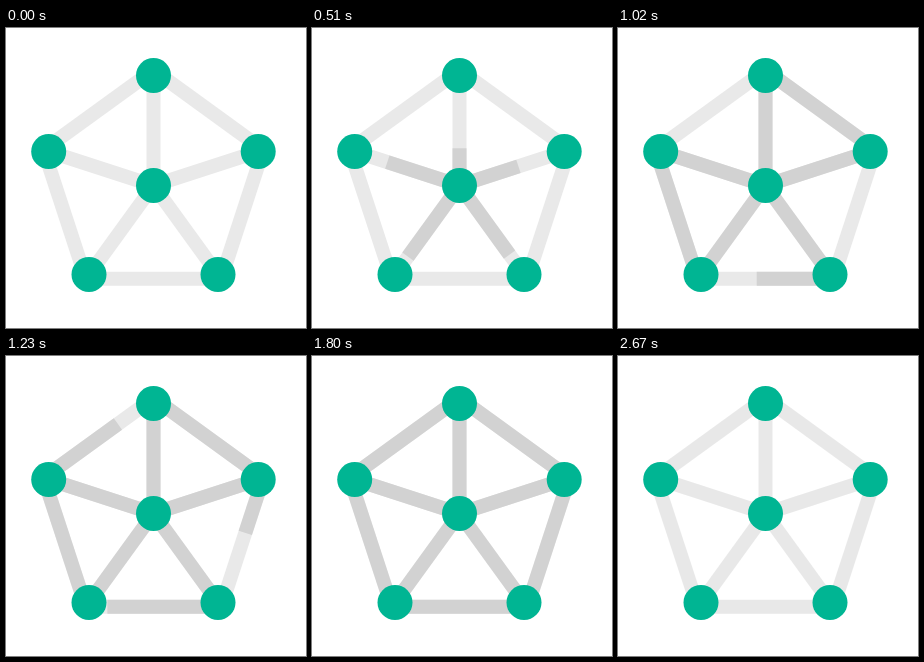
An HTML page that plays this animation: 300 px wide and 300 px high, repeating every 2700 ms.

```html
<!DOCTYPE html>
<html lang="en">
<head>
<meta charset="utf-8">
<title>Network loader</title>
<style>
html, body { margin: 0; width: 100%; height: 100%; overflow: hidden; background: #fff; }
svg { display: block; width: 100%; height: 100%; fill: none; stroke-width: 14; }
#base { stroke: #e9e9e9; }
#active { stroke: #d2d2d2; }
#dots { fill: #00b593; }
</style>
</head>
<body>
<svg viewBox="0 0 300 300">
  <g id="base"></g>
  <g id="active"></g>
  <g id="dots"></g>
</svg>
<script>
const LOOP = 2700;
const FADE = { start: 2000, duration: 720 };
const EDGE_OFFSET = 4.3;

const nodes = {
  center: [147.5, 157.5],
  top: [147.5, 47.5],
  right: [252.2, 123.5],
  bottomRight: [212, 246.5],
  bottomLeft: [83, 246.5],
  left: [42.7, 123.5]
};

// from, to, start, duration
const links = [
  ['center', 'bottomLeft', 64, 900],
  ['center', 'bottomRight', 84, 900],
  ['center', 'left', 147, 900],
  ['center', 'right', 250, 800],
  ['center', 'top', 314, 900],
  ['bottomLeft', 'left', 461, 900],
  ['top', 'right', 695, 510],
  ['bottomRight', 'bottomLeft', 725, 900],
  ['left', 'top', 950, 700],
  ['right', 'bottomRight', 1000, 900]
];

const clamp = x => Math.min(1, Math.max(0, x));

function cubicBezier(x1, y1, x2, y2) {
  const curve = (a, b, t) => 3 * (1 - t) ** 2 * t * a + 3 * (1 - t) * t * t * b + t ** 3;
  return x => {
    if (x <= 0 || x >= 1) return clamp(x);
    let low = 0, high = 1;
    for (let i = 0; i < 24; i++) {
      const mid = (low + high) / 2;
      if (curve(x1, x2, mid) < x) low = mid; else high = mid;
    }
    return curve(y1, y2, low);
  };
}

const ease = cubicBezier(0.25, 0.1, 0.25, 1);
const easeInOut = cubicBezier(0.42, 0, 0.58, 1);

function add(parent, tag, attributes) {
  const element = document.createElementNS('http://www.w3.org/2000/svg', tag);
  for (const name in attributes) element.setAttribute(name, attributes[name]);
  return parent.appendChild(element);
}

// Outer edges sit slightly outside the line between their nodes.
function endpoints(from, to) {
  const [a, b, c] = [nodes[from], nodes[to], nodes.center];
  let dx = 0, dy = 0;
  if (from !== 'center') {
    const nx = (a[0] + b[0]) / 2 - c[0], ny = (a[1] + b[1]) / 2 - c[1];
    const scale = EDGE_OFFSET / Math.hypot(nx, ny);
    dx = nx * scale;
    dy = ny * scale;
  }
  return { x1: a[0] + dx, y1: a[1] + dy, x2: b[0] + dx, y2: b[1] + dy };
}

const [base, active, dots] = ['base', 'active', 'dots'].map(id => document.getElementById(id));

const bars = links.map(([from, to, start, duration]) => {
  const ends = endpoints(from, to);
  add(base, 'line', ends);
  return { ends, start, duration, line: add(active, 'line', ends) };
});

for (const [cx, cy] of Object.values(nodes)) add(dots, 'circle', { cx, cy, r: 17.5 });

function draw(time) {
  for (const { ends, start, duration, line } of bars) {
    const p = ease(clamp((time - start) / duration));
    line.setAttribute('x2', ends.x1 + (ends.x2 - ends.x1) * p);
    line.setAttribute('y2', ends.y1 + (ends.y2 - ends.y1) * p);
  }
  active.setAttribute('opacity', 1 - easeInOut(clamp((time - FADE.start) / FADE.duration)));
}

const origin = performance.now();
function frame() {
  draw((performance.now() - origin) % LOOP);
  requestAnimationFrame(frame);
}
frame();
</script>
</body>
</html>
```
